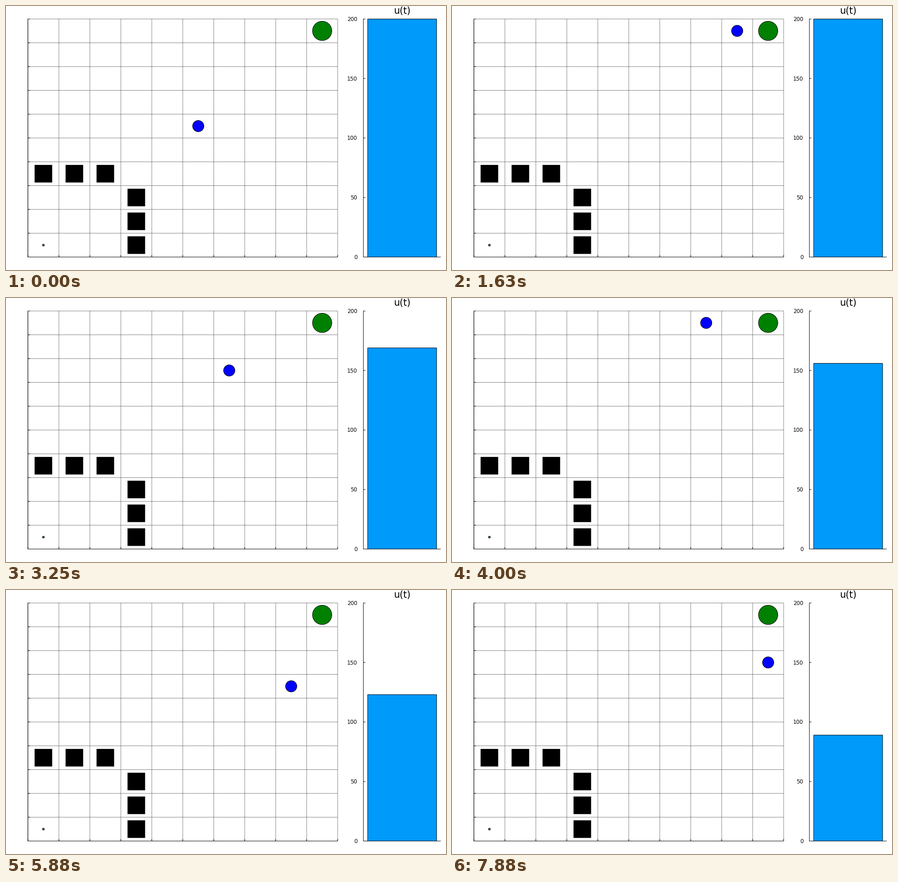
Recreate the animation shown at these times as a matplotlib script. Size 966 px wide and 580 px high, loop 8000 ms.

```python
import matplotlib.pyplot as plt
from matplotlib.animation import FuncAnimation
from matplotlib.patches import Circle, Rectangle

W, H, DPI = 966, 580, 100
PX = 72 / DPI
LEFT, TOP, BASE = 48.1, 28.5, 551.5
CELL_W, CELL_H = 68, 52.3
BAR_L, BAR_R, AXIS_X = 794, 945.3, 784.6
U_MAX = 200

# One step per tick; "." means staying in place.
STEPS = """
E NE N SE N . NE W NW S E . N
SW SW NW SW W S NE S . SE NE . N
N W N E S NE SE E SW SW E NE
S . SW E W W . NE .
. . S . NW . N . NW
SE SE W SE NE W NE
""".split()


def walk(start, energy):
    """Cells visited and energy left; a step costs 1 plus 1 per axis moved."""
    x, y = start
    states = [(x, y, energy)]
    for step in STEPS:
        dx = ("E" in step) - ("W" in step)
        dy = ("N" in step) - ("S" in step)
        x, y = x + dx, y + dy
        energy -= 1 + abs(dx) + abs(dy)
        states.append((x, y, energy))
    return states


STATES = walk((5, 5), 228)

fig = plt.figure(figsize=(W / DPI, H / DPI), dpi=DPI, facecolor="white")
ax = fig.add_axes([0, 0, 1, 1])
ax.set(xlim=(0, W), ylim=(H, 0))
ax.axis("off")


def line(x0, y0, x1, y1, alpha=1, z=2):
    ax.plot([x0, x1], [y0, y1], color="black", lw=PX, alpha=alpha,
            solid_capstyle="butt", snap=False, zorder=z)


def center(col, row):
    return LEFT + CELL_W * (col + 0.5), BASE - CELL_H * (row + 0.5)


def disc(col, row, radius, color):
    patch = Circle(center(col, row), radius, fc=color, ec="black", lw=PX, zorder=4)
    return ax.add_patch(patch)


def block(col, row, half=19.3):
    x, y = center(col, row)
    ax.add_patch(Rectangle((x - half, y - half), 2 * half, 2 * half,
                           fc="black", lw=0, snap=False, zorder=3))


def level(u):
    return BASE - u * (BASE - TOP) / U_MAX


def label(x, y, text, size, ha):
    ax.text(x, y, text, fontsize=size * PX, ha=ha, va="baseline",
            family="DejaVu Sans", color="black")


# Grid world
right = LEFT + 10 * CELL_W
for i in range(11):
    x, y = LEFT + i * CELL_W, TOP + i * CELL_H
    line(x, TOP, x, BASE, 0.5, 1)
    line(LEFT, y, right, y, 0.5, 1)
    line(x, BASE, x, BASE - 4.5)
    line(LEFT, y, LEFT + 4.5, y)
line(LEFT, TOP - 0.5, LEFT, BASE + 0.5)
line(LEFT, BASE, right, BASE)

for i in range(3):
    block(i, 3)
    block(3, i)
disc(0, 0, 2.1, "green")
disc(9, 9, 21.2, "green")
agent = disc(5, 5, 12.4, "blue")

# Energy bar
line(AXIS_X, TOP - 0.5, AXIS_X, BASE + 0.5)
line(AXIS_X, BASE, 954.5, BASE)
for u in range(0, U_MAX + 1, 50):
    line(AXIS_X, level(u), AXIS_X + 4.5, level(u))
    label(771.3, level(u) + 4.3, str(u), 11.8, "right")
label(869.6, 17, "u(t)", 20.7, "center")
bar = ax.add_patch(Rectangle((BAR_L, BASE), BAR_R - BAR_L, 0, fc="#009afa",
                             ec="black", lw=PX, snap=False, zorder=3))


def update(i):
    x, y, u = STATES[i]
    agent.set_center(center(x, y))
    bar.set_height(level(min(u, U_MAX)) - BASE)
    return agent, bar


anim = FuncAnimation(fig, update, frames=len(STATES), interval=125,
                     repeat=True, repeat_delay=0, blit=False)
plt.show()
```
